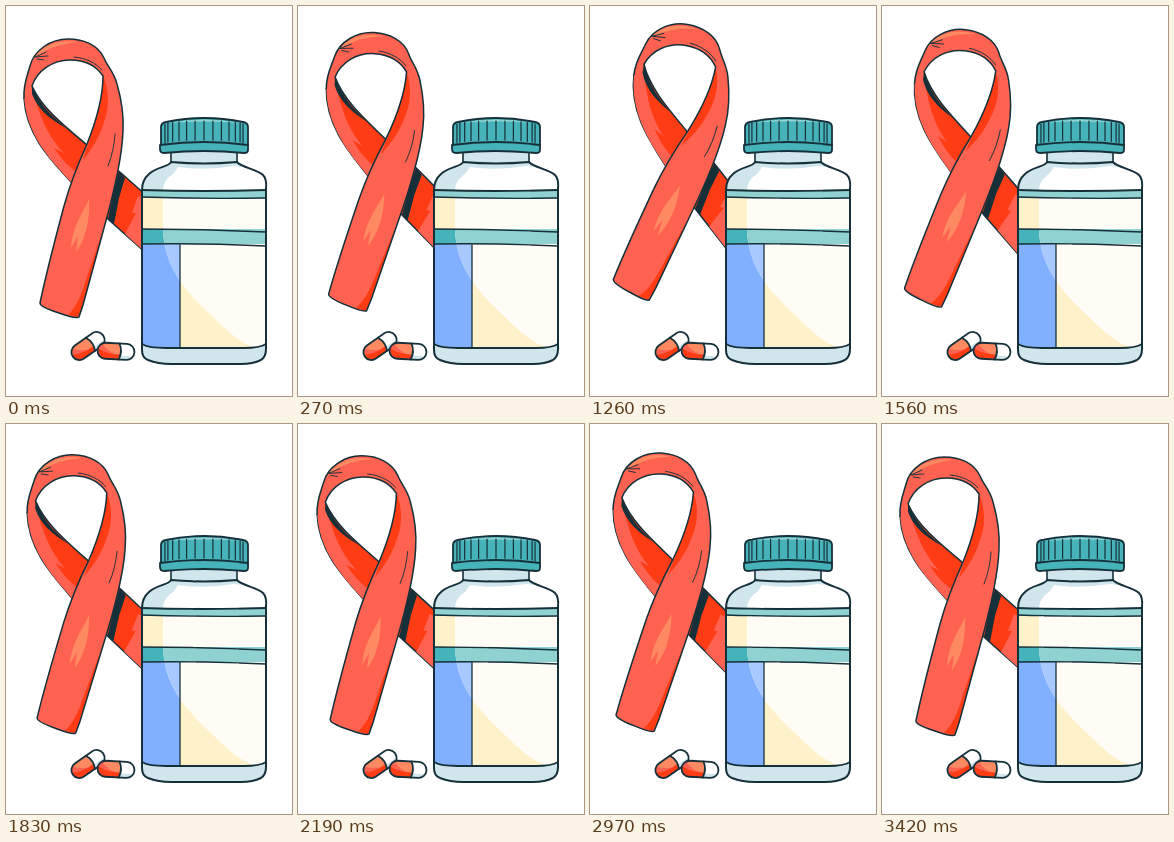
Recreate the animation shown at these times as an HTML page. Size 286 px wide and 390 px high, loop 3450 ms.

```html
<!DOCTYPE html>
<html lang="en">
<head>
<meta charset="utf-8">
<title>Ribbon and pill bottle</title>
<style>
  html, body { margin: 0; width: 100%; height: 100%; overflow: hidden; background: #fff; }
  svg { display: block; width: 286px; height: 390px; }
  .ink { stroke: #16303a; stroke-linecap: round; stroke-linejoin: round; }
  .line { fill: none; }
  .salmon { fill: #ff6250; }
  .red { fill: #ff3c14; }
  .glow { fill: #ff8a62; }
  .dark { fill: #16303a; }
  .teal { fill: #46b2b9; }
  .mint { fill: #90d1d1; }
  .ice { fill: #d0e5ec; }
  .cream { fill: #fffcf5; }
  .yellow { fill: #fff1c9; }
</style>
</head>
<body>
<svg viewBox="0 0 286 390">
  <defs>
    <clipPath id="body">
      <path id="shape" d="M165 156C163 161 150 161 143 168Q136 174 136 184V344Q136 352 142 354Q152 358 165 358H235Q247 358 255 354Q260 351 260 343V183Q261 173 257 169C251 163 236 162 231 156Q198 159 165 156Z"/>
    </clipPath>
    <clipPath id="shine">
      <path d="M157 150V225C159 262 180 286 205 309C222 326 236 339 252 342H262V150Z"/>
    </clipPath>
    <g id="pill" stroke-width="1.8">
      <rect class="salmon" x="-18.5" y="-8" width="37" height="16" rx="8"/>
      <path class="glow" d="M-14-6Q-5-8 3-8Q7 0 4 4Q-4 4-14-6Z"/>
      <path fill="#fff" d="M3-8H10.5A8 8 0 0 1 10.5 8H3Q7 0 3-8Z"/>
      <path class="ice" d="M4 4H16Q14 7.5 10 7.5H3Z"/>
      <path class="red" d="M-18-2Q-8 4 4 3L3 8H-11Q-17 7-18-2Z"/>
      <rect class="ink line" x="-18.5" y="-8" width="37" height="16" rx="8"/>
      <path class="ink line" d="M3-8Q7 0 3 8"/>
    </g>
  </defs>

  <g id="ribbon" stroke-width="1.5">
    <path class="ink red" d="M26 80C36 102 56 118 81 139L115 167L150 198V256L103 214L67 178C46 155 20 130 18 92"/>
    <path class="salmon" d="M18 88C19 128 45 155 67 178L72 167C62 160 56 154 48 142L58 147C43 132 34 112 26 82ZM150 200L132 190L126 207L130 207L119 228L150 256Z"/>
    <path class="dark" d="M26 79C35 101 46 110 60 122C43 113 31 102 26 88ZM113 165L109 178L102 213L108 218L113 192L119 172Z"/>
    <path class="salmon" d="M18 92C17 78 22 68 24 60C28 44 45 33 62 33C78 33 92 39 98 52C101 60 108 66 111 78C115 92 118 108 117 125C116 155 107 190 98 222L77 299L73 311Q70 313 53 307Q34 301 34 297C40 268 50 230 58 200C63 182 71 160 81 138C89 118 97 95 97 70C89 58 77 54 64 54C46 54 31 65 26 80"/>
    <path class="red" d="M97 70C104 86 103 103 98 116C94 130 86 143 77 154C85 127 97 100 97 70ZM97 224L77 299L72 311L62 309C72 300 77 284 82 268Z"/>
    <path class="glow" d="M83 193C77 207 67 219 65 242L72 230L70 246C79 234 84 216 83 193ZM27 54C36 38 54 33 72 36C54 38 40 42 27 54Z"/>
    <path class="ink line" stroke-width=".9" d="M29 51L40 46M29 51L42 50M31 53L38 54M68 51C80 52 90 57 96 64M109 128Q108 145 102 160"/>
    <path class="ink line" d="M18 92C17 78 22 68 24 60C28 44 45 33 62 33C78 33 92 39 98 52C101 60 108 66 111 78C115 92 118 108 117 125C116 155 107 190 98 222L77 299L73 311Q70 313 53 307Q34 301 34 297C40 268 50 230 58 200C63 182 71 160 81 138C89 118 97 95 97 70C89 58 77 54 64 54C46 54 31 65 26 80"/>
  </g>

  <g id="bottle">
    <rect class="ink ice" x="165" y="144" width="66" height="18" stroke-width="1.6"/>
    <g clip-path="url(#body)">
      <rect class="ice" x="135" y="155" width="126" height="204"/>
      <path fill="#fff" d="M157 185C157 177 161 172 168 167L172 161Q198 165 228 160L262 164V185Z"/>
      <rect class="mint" x="135" y="184" width="126" height="9"/>
      <rect class="yellow" x="135" y="192" width="126" height="150"/>
      <rect class="teal" x="135" y="223" width="126" height="15"/>
      <rect fill="#80b0ff" x="135" y="238" width="39" height="104"/>
      <g clip-path="url(#shine)">
        <rect class="cream" x="135" y="192" width="126" height="150"/>
        <rect class="mint" x="135" y="223" width="126" height="15"/>
        <rect fill="#a7c9ff" x="135" y="238" width="39" height="104"/>
      </g>
      <path class="ice" d="M135 338Q142 342 160 342H238Q254 342 261 338V360H135Z"/>
      <path class="ink line" stroke-width="1.8" d="M136 184Q198 186 260 184M136 338Q142 342 160 342H238Q254 342 260 338"/>
      <path class="ink line" stroke-width="1.3" d="M136 191Q198 193 260 192M136 223Q198 223 260 226M136 238Q198 237 260 240M174 238V341"/>
    </g>
    <use href="#shape" class="ink line" stroke-width="2"/>
    <path class="ink teal" stroke-width="1.8" d="M155 139V121Q155 117 160 116Q198 108 237 116Q242 117 242 121V139Z"/>
    <path class="mint" d="M162 117Q198 110 235 117Q198 114 162 117Z"/>
    <path id="ridges" class="ink line" stroke-width="1.2"/>
    <path class="ink teal" stroke-width="1.8" d="M154 139Q198 133 242 139V144Q242 147 238 147Q198 143 158 147Q154 147 154 143Z"/>
  </g>

  <use href="#pill" transform="translate(82 340) rotate(-35)"/>
  <use href="#pill" transform="translate(110 345.3) rotate(3)"/>
</svg>
<script>
  const LOOP = 3450, PIVOT = "180 241";

  // time, turn in degrees, shift x, shift y
  const keys = [
    [0, 0, 0, 0], [270, 3.8, 0, 1], [540, 8, 0, 0.5], [810, 10.3, 0, 0],
    [1020, 10.8, -1, 0.8], [1260, 10.2, -3, 3], [1440, 8.8, -5.5, 4],
    [1620, 6.3, -5.5, 3.8], [1830, 1.7, -1.3, 1.2], [1980, -0.2, -0.5, 0],
    [2190, 0.8, -1, 0.5], [2520, 4.1, -5.2, 3.5], [2715, 4.8, -6, 4],
    [2910, 4.1, -5.2, 3.5], [3240, 0.8, -1, 0.5], [LOOP, 0, 0, 0]
  ];
  const last = keys.length - 1;

  const slope = (i, c) => {
    const k = (i + last) % last;
    const a = keys[k], b = keys[k + 1];
    return (b[c] - a[c]) / (b[0] - a[0]);
  };

  // harmonic mean keeps the curve from overshooting its keys
  const tangent = (i, c) => {
    const a = slope(i - 1, c), b = slope(i, c);
    return a * b > 0 ? 2 * a * b / (a + b) : 0;
  };

  function valueAt(t, c) {
    let i = 0;
    while (i < last - 1 && t >= keys[i + 1][0]) i++;
    const a = keys[i], b = keys[i + 1], d = b[0] - a[0], u = (t - a[0]) / d, v = 1 - u;
    return v * v * (1 + 2 * u) * a[c] + u * u * (1 + 2 * v) * b[c]
      + d * u * v * (v * tangent(i, c) - u * tangent(i + 1, c));
  }

  let d = "";
  for (let i = 0; i < 13; i++) {
    const s = i / 6 - 1;
    const x = 198 + 40 * Math.sin(s * 1.35);
    d += `M${x} ${115 + 3 * s * s}V${134 + 3 * s * s}`;
  }
  document.getElementById("ridges").setAttribute("d", d);

  const ribbon = document.getElementById("ribbon");
  const start = performance.now();
  function draw() {
    const t = (performance.now() - start) % LOOP;
    const [turn, x, y] = [1, 2, 3].map(c => valueAt(t, c));
    ribbon.setAttribute("transform", `translate(${x} ${y}) rotate(${turn} ${PIVOT})`);
    requestAnimationFrame(draw);
  }
  draw();
</script>
</body>
</html>
```
